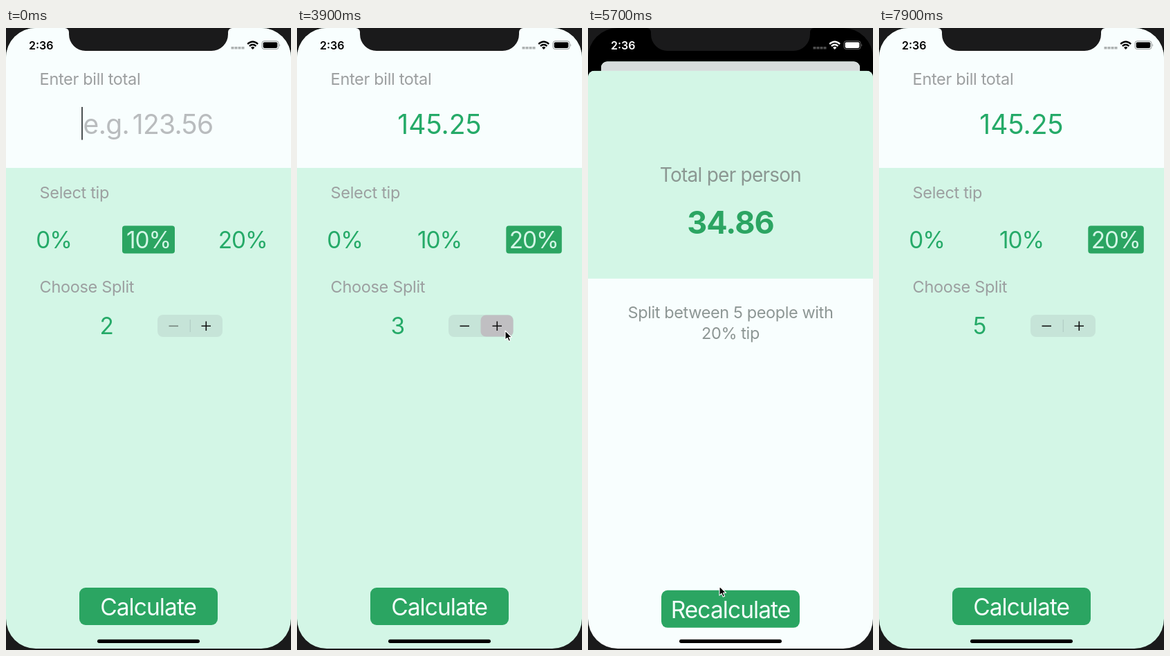
An HTML page that plays this animation: 412 by 898 pixels, repeating every 8 s.

```html
<!DOCTYPE html>
<html lang="en">
<head>
<meta charset="utf-8">
<title>Tip calculator</title>
<style>
  html, body { margin: 0; width: 100%; height: 100%; overflow: hidden; background: #1a1a1b; }
  svg { display: block; width: 100%; height: 100%; }
  text { font-family: Inter, Roboto, sans-serif; font-optical-sizing: none; letter-spacing: -.02em; }
  .mid { text-anchor: middle; }
  .label { font-size: 23.5px; fill: #9c9fa0; letter-spacing: -.014em; }
  .bill { font-size: 39px; fill: #25aa68; letter-spacing: 0; }
  .hint { fill: #b9bcbe; letter-spacing: -.018em; word-spacing: -.14em; }
  .num { font-size: 33.3px; fill: #25aa68; letter-spacing: -.03em; }
  .num.on { fill: #d3f6e6; }
  .button { fill: #2ba562; }
  .action { font-size: 33.5px; fill: #f3fdfa; letter-spacing: -.028em; }
  .info { font-size: 23.5px; fill: #8d9694; letter-spacing: -.017em; }
  .head { font-size: 28px; fill: #8b9792; letter-spacing: -.027em; }
  .total { font-size: 45px; font-weight: 700; fill: #2ba562; }
  .clock { font-size: 16px; font-weight: 600; letter-spacing: 0; }
</style>
</head>
<body>
<svg viewBox="0 0 412 898" preserveAspectRatio="none">
  <defs>
    <clipPath id="screen"><rect width="412" height="896" rx="43"/></clipPath>
    <clipPath id="card"><rect id="cardEdge" width="412" height="920"/></clipPath>
    <clipPath id="sheetEdge"><rect width="412" height="920" rx="9"/></clipPath>
  </defs>
  <rect width="412" height="898" fill="#1a1a1b"/>
  <g clip-path="url(#screen)">
    <rect width="412" height="896"/>

    <g id="back" clip-path="url(#card)">
      <rect width="412" height="920" fill="#d3f6e6"/>
      <rect width="412" height="202" fill="#f8fefe"/>
      <text class="label" x="48.6" y="82">Enter bill total</text>
      <text id="hint" class="bill hint mid" x="205.5" y="153">e.g. 123.56</text>
      <text id="bill" class="bill mid" x="206" y="153"></text>
      <rect id="caret" y="114" width="2" height="47.5" fill="#4b5152"/>

      <text class="label" x="48.6" y="246">Select tip</text>
      <rect id="tipBox" y="285.5" height="40" rx="4" class="button"/>
      <text class="num mid" x="69" y="318">0%</text>
      <text id="tip10" class="num mid" x="206" y="318">10%</text>
      <text id="tip20" class="num mid" x="342.3" y="318">20%</text>

      <text class="label" x="48.6" y="382">Choose Split</text>
      <text id="split" class="num mid" x="145.2" y="441.5">2</text>
      <rect x="219" y="414" width="94" height="32" rx="8" fill="#767680" fill-opacity=".14"/>
      <path id="divider" d="M266.3 421v18" stroke="#3c3c43" stroke-opacity=".16"/>
      <rect id="press" x="265.5" y="414.5" width="47" height="31" rx="7.5" fill="#c0bfc2"/>
      <path id="minus" d="M235.5 430.3h13.5" stroke-width="1.6"/>
      <path d="M282.5 430.3h13.5M289.3 423.5v13.5" stroke="#111" stroke-width="1.6"/>

      <rect x="106" y="808" width="200" height="54" rx="9" class="button"/>
      <text class="action mid" x="205.7" y="848">Calculate</text>
      <rect id="dim" width="412" height="920"/>
    </g>

    <g id="status">
      <text class="clock" x="33" y="30.5">2:36</text>
      <path opacity=".3" d="M325.5 27h4v3.5h-4zM330.5 27h4v3.5h-4zM335.5 27h4v3.5h-4zM340.5 27h4v3.5h-4z"/>
      <g fill="none" stroke-width="2.3">
        <path d="M349.2 23.2Q356.7 16.4 364.2 23.2"/>
        <path d="M351.9 26.1Q356.7 21.8 361.5 26.1"/>
      </g>
      <path d="M356.7 31l-2.7-2.8q2.7-2.3 5.4 0z"/>
      <rect x="370" y="18.8" width="24" height="11.8" rx="3.3" fill="none" opacity=".4"/>
      <rect x="371.7" y="20.5" width="20.6" height="8.4" rx="1.8"/>
      <path d="M395.3 22.6q1.8 2.1 0 4.2z" opacity=".4"/>
    </g>

    <g id="sheet" clip-path="url(#sheetEdge)">
      <rect width="412" height="920" fill="#f8fefe"/>
      <rect width="412" height="300" fill="#d3f6e6"/>
      <text class="head mid" x="206" y="160">Total per person</text>
      <text class="total mid" x="206" y="235">34.86</text>
      <text class="info mid" x="206" y="357.5">Split between 5 people with</text>
      <text class="info mid" x="206" y="387">20% tip</text>
      <rect x="106" y="750" width="200" height="54" rx="9" class="button"/>
      <text class="action mid" x="206" y="790">Recalculate</text>
    </g>

    <path d="M85 0A6 6 0 0 1 91 6V9A24 24 0 0 0 115 33H297A24 24 0 0 0 321 9V6A6 6 0 0 1 327 0Z" fill="#1a1a1b"/>
    <rect x="132" y="882.7" width="148" height="5.2" rx="2.6"/>
  </g>
  <path id="cursor" d="M0 0V13.2L3.1 10.4L5.2 15.2L7.6 14.2L5.5 9.5H9.6Z" stroke="#fff" stroke-width="1.1" stroke-linejoin="round"/>
</svg>
<script>
const LOOP = 8000, STEP = 100;
const BILL = '145.25';
const KEYS = [700, 950, 1200, 1450, 1700, 1950];
const TIP_AT = 3000;
const PRESSES = [[3700, 3960], [4100, 4260], [4400, 4560]];
const OPEN = 5274, CLOSE = 6759;
// time, x, y of the pointer
const POINTER = [
  [2500, 262, 372], [2900, 344, 311], [3150, 344, 311], [3600, 301, 437],
  [4650, 301, 437], [5100, 189, 830], [5250, 189, 830], [5400, 189, 811],
  [5700, 190, 806], [6200, 190, 806], [6600, 198, 843], [7400, 198, 843]
];

const $ = {};
document.querySelectorAll('[id]').forEach(e => $[e.id] = e);
const set = (e, attrs) => { for (const k in attrs) e.setAttribute(k, attrs[k]); };
const show = (e, on) => set(e, { visibility: on ? 'visible' : 'hidden' });
const clamp = v => Math.min(1, Math.max(0, v));
const lerp = (a, b, k) => a + (b - a) * k;
const ease = k => k * k * (3 - 2 * k);
const within = (t, a, b) => t >= a && t < b;
const mix = (a, b, k) => `rgb(${a.map((v, i) => Math.round(lerp(v, b[i], k)))})`;

// critically damped spring from 0 to 1
function spring(ms) {
  const x = Math.max(0, ms) * 0.0177;
  return 1 - (1 + x) * Math.exp(-x);
}

function drawForm(t) {
  const typed = BILL.slice(0, KEYS.filter(k => t >= k).length);
  $.bill.textContent = typed;
  show($.hint, !typed);
  set($.caret, { x: typed ? 206 + $.bill.getComputedTextLength() / 2 - 1 : 109 });
  show($.caret, t < 2550 || within(t, 2800, TIP_AT));

  const high = t >= TIP_AT;
  set($.tipBox, {
    x: high ? 302.3 : 168,
    width: high ? 80.5 : 76,
    style: 'fill:' + mix([43, 165, 98], [94, 169, 141], within(t, OPEN, CLOSE) ? clamp((t - OPEN) / 120) : 0)
  });
  $.tip10.classList.toggle('on', !high);
  $.tip20.classList.toggle('on', high);

  const people = 2 + PRESSES.filter(p => t >= p[0]).length;
  const pressed = PRESSES.some(p => within(t, ...p));
  $.split.textContent = people;
  show($.press, pressed);
  show($.divider, !pressed);
  set($.minus, { stroke: people > 2 ? '#111' : '#74837c' });
}

function drawSheet(t) {
  const p = t < CLOSE ? spring(t - OPEN) : 1 - spring(t - CLOSE);
  const s = 1 - 0.092 * p;
  set($.back, { transform: `translate(${206 * (1 - s)} ${48.5 * p}) scale(${s})` });
  set($.cardEdge, { rx: lerp(34, 10, p) });
  set($.dim, { opacity: 0.135 * p });
  set($.sheet, { transform: `translate(0 ${lerp(896, 58, p)})` });

  const light = t < CLOSE ? clamp((t - OPEN - 60) / 350) : 1 - clamp((t - CLOSE) / 430);
  const tone = mix([0, 0, 0], [255, 255, 255], light);
  set($.status, { fill: tone, stroke: 'none' });
  $.status.querySelectorAll('[fill=none]').forEach(e => set(e, { stroke: tone }));
}

function drawPointer(t) {
  const i = POINTER.findIndex(k => t < k[0]);
  show($.cursor, i > 0);
  if (i < 1) return;
  const [t0, x0, y0] = POINTER[i - 1], [t1, x1, y1] = POINTER[i];
  const k = ease((t - t0) / (t1 - t0));
  set($.cursor, { transform: `translate(${lerp(x0, x1, k)} ${lerp(y0, y1, k)})` });
}

// the screen refreshes ten times a second
const start = performance.now();
function frame() {
  const step = Math.floor((performance.now() - start) / STEP + 0.1);
  const t = step * STEP % LOOP;
  drawForm(t);
  drawSheet(t);
  drawPointer(t);
  requestAnimationFrame(frame);
}
frame();
</script>
</body>
</html>
```
